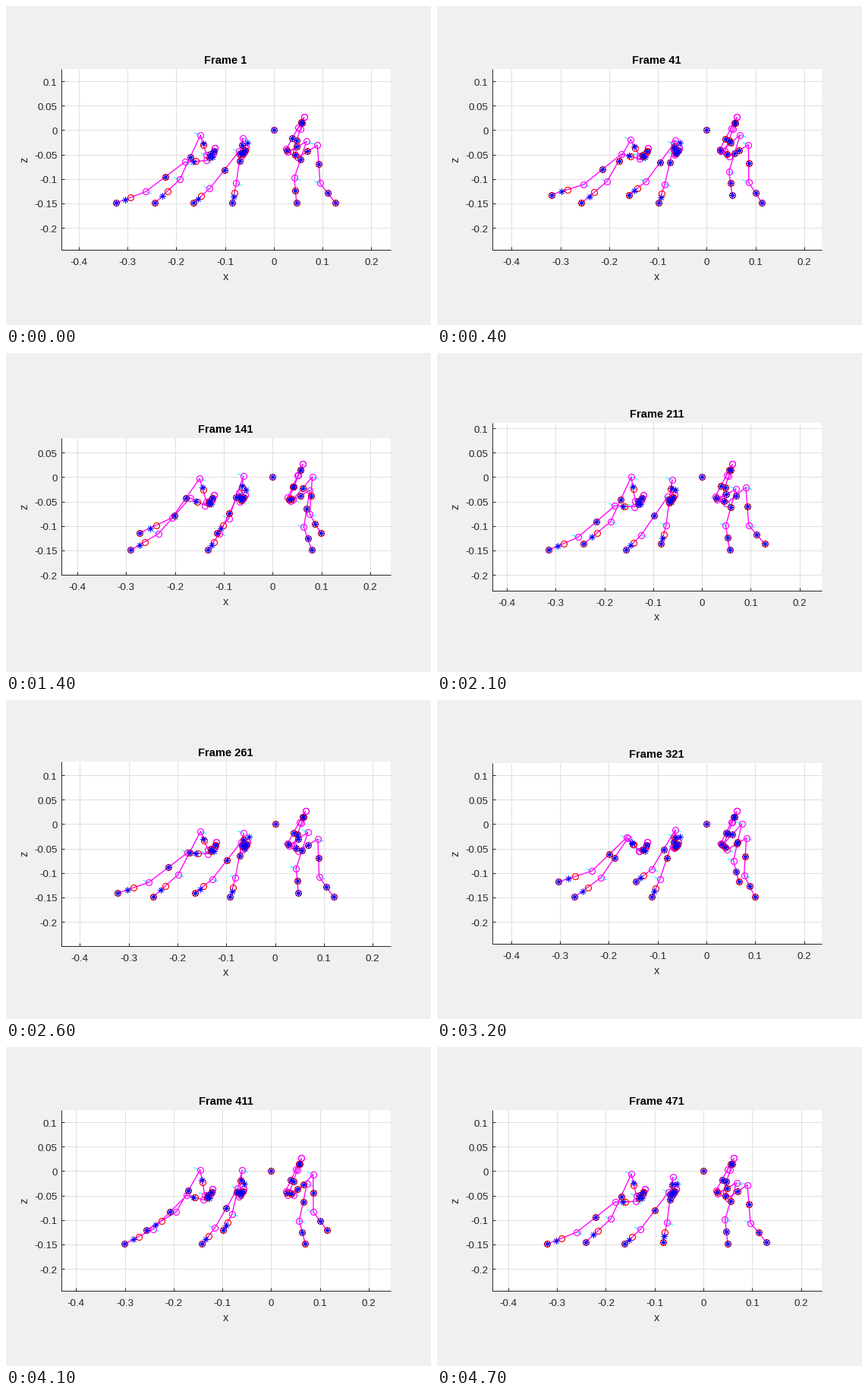
A matplotlib script that plays this animation: 560 by 420 pixels, repeating every 4800 ms.

```python
import numpy as np
import matplotlib.pyplot as plt
from matplotlib.animation import FuncAnimation

plt.rcParams["font.family"] = "Liberation Sans"

W, H, FRAMES = 560, 420, 48
HALF = FRAMES // 2
SCALE = 643                      # pixels per unit
LEFT, RIGHT, MID_X, MID_Y, ZERO_Y = 72, 506.5, 289, 202, 163
INK, GRID = "#262626", "#dfdfdf"
GROUND, STRIDE, LIFT = 259, 51.5, 23.5


class Row:
    """A mirrored pair of legs, given by its joints with the foot at the
    rear and at the front, from body to ankle, relative to the head."""

    def __init__(self, foot, rear, front, lift, side, femur_com=.5, foot_com=.5):
        self.rear = np.array([*rear, (foot, GROUND)], float)
        self.front = np.array([*front, (foot + STRIDE, GROUND)], float)
        self.lift = np.outer([0] * (len(rear) - 3) + [.2, 1, 1, 0], lift)
        self.lift[-1] = 0, -LIFT
        self.side = side
        self.com = np.full((len(rear), 1), .5)
        self.com[-3], self.com[-1] = femur_com, foot_com

    def joints(self, n):
        reach, height = gait(n)
        return self.rear + reach * (self.front - self.rear) + height * self.lift


def gait(n):
    """Foot reach and height: swing forward, then slide back on the ground."""
    u = n % FRAMES / HALF
    if u >= 1:
        return 2 - u, 0
    return (1 - np.cos(np.pi * u)) / 2 + u ** 6 * (1 - u), np.sin(np.pi * u) ** 1.1


ROWS = [
    Row(-208.2,
        [(-77.5, 187), (-80, 194), (-89.3, 203), (-117.3, 205), (-169, 244)],
        [(-77.5, 187), (-80, 194), (-88.5, 196), (-96.5, 169.5), (-124, 228)],
        lift=(8, -18), side=1, femur_com=.6, foot_com=.69),
    Row(-106.3,
        [(-36.5, 186.5), (-39, 192), (-43, 197.5), (-46, 191), (-84.5, 240)],
        [(-36.5, 186.5), (-39, 192), (-42.5, 192.5), (-41, 173.5), (-49.5, 233)],
        lift=(4.5, -19), side=-1, femur_com=.55, foot_com=.69),
    Row(30,
        [(40, 146), (32, 160), (16.5, 188), (18, 192), (43, 178), (27, 226)],
        [(40, 146), (35, 161.5), (25.5, 191.5), (31.5, 199), (57.5, 183), (61, 233)],
        lift=(0, -19.5), side=1),
]


def half_height(n):
    """The plot box grows slowly and snaps back."""
    return np.interp(n, [7, 8, 13, 14, 24, 30, 31], [119, 93, 118, 90, 119, 126, 119])


fig = plt.figure(figsize=(W / 96, H / 96), dpi=96, facecolor="#f0f0f0")
ax = fig.add_axes([0, 0, 1, 1])


def line(xs, ys, color, z, width=.75):
    ax.plot(xs, ys, color=color, lw=width, zorder=z, solid_capstyle="butt")


def dots(pts, color, z):
    ax.plot(*np.transpose(pts), "o", ms=6, mfc="none", mec=color, mew=.9, zorder=z)


def stars(pts):
    ax.plot(*np.transpose(pts), ls="none", marker=(8, 2, 0), ms=6,
            mec="blue", mew=.65, zorder=7)


def label(x, y, text, size=10, **style):
    ax.text(x, y, text, size=size, **{"color": INK, "ha": "center", **style})


def draw_axes(n, x0):
    half = half_height(n)
    top, bottom = MID_Y - half, MID_Y + half
    ax.add_patch(plt.Rectangle((LEFT, top), RIGHT - LEFT, 2 * half,
                               fc="white", ec="none", zorder=0))
    for k in range(-4, 4):
        x = x0 + k * .1 * SCALE
        if LEFT < x < RIGHT:
            line([x, x], [top, bottom], GRID, 1)
            line([x, x], [bottom, bottom - 4], INK, 2)
            label(x, bottom + 20, f"{k / 10:g}")
    for k in range(-6, 4):
        y = ZERO_Y - k * .05 * SCALE
        if top < y < bottom:
            line([LEFT, RIGHT], [y, y], GRID, 1)
            line([LEFT, LEFT + 4], [y, y], INK, 2)
            label(LEFT - 5, y + 5.5, f"{k / 20:g}", ha="right")
    line([LEFT, LEFT, RIGHT], [top, bottom, bottom], INK, 2)
    label(MID_X, bottom + 39.5, "x", 11)
    label(24, MID_Y, "z", 11, rotation=90, va="center")
    label(MID_X, top - 7.5, f"Frame {10 * n + 1}", 11, weight="bold", color="black")


def draw_leg(row, pts, side):
    seg = np.diff(pts, axis=0)
    for x, y in pts[-4:-1]:
        line([x, x + 8 * side], [y, y + 3 * side], "cyan", 3)
    line(*pts.T, "magenta", 4, 1)
    dots(pts[:-1], "magenta", 5)
    dots([*(pts[:-1] + seg / 2), pts[-1]], "red", 6)
    stars([*(pts[:-1] + seg * row.com), pts[-1]])


def draw(n):
    ax.clear()
    ax.axis("off")
    ax.set(xlim=(-.5, W - .5), ylim=(H - .5, -.5))
    legs = [(row, row.joints(n + lag), row.side * way)
            for row in ROWS for lag, way in ((0, 1), (HALF, -1))]
    tips = [pts[-1, 0] for _, pts, _ in legs]
    x0 = MID_X - (min(tips) + max(tips)) / 2
    draw_axes(n, x0)
    for row, pts, side in legs:
        draw_leg(row, pts + (x0, 0), side)
    dots([(x0, ZERO_Y)], "red", 6)
    stars([(x0, ZERO_Y), (x0 - 35, 180), (x0 - 81, 199)])
    return []


anim = FuncAnimation(fig, draw, frames=FRAMES, init_func=lambda: [],
                     interval=100, repeat=True, repeat_delay=0)
plt.show()
```
